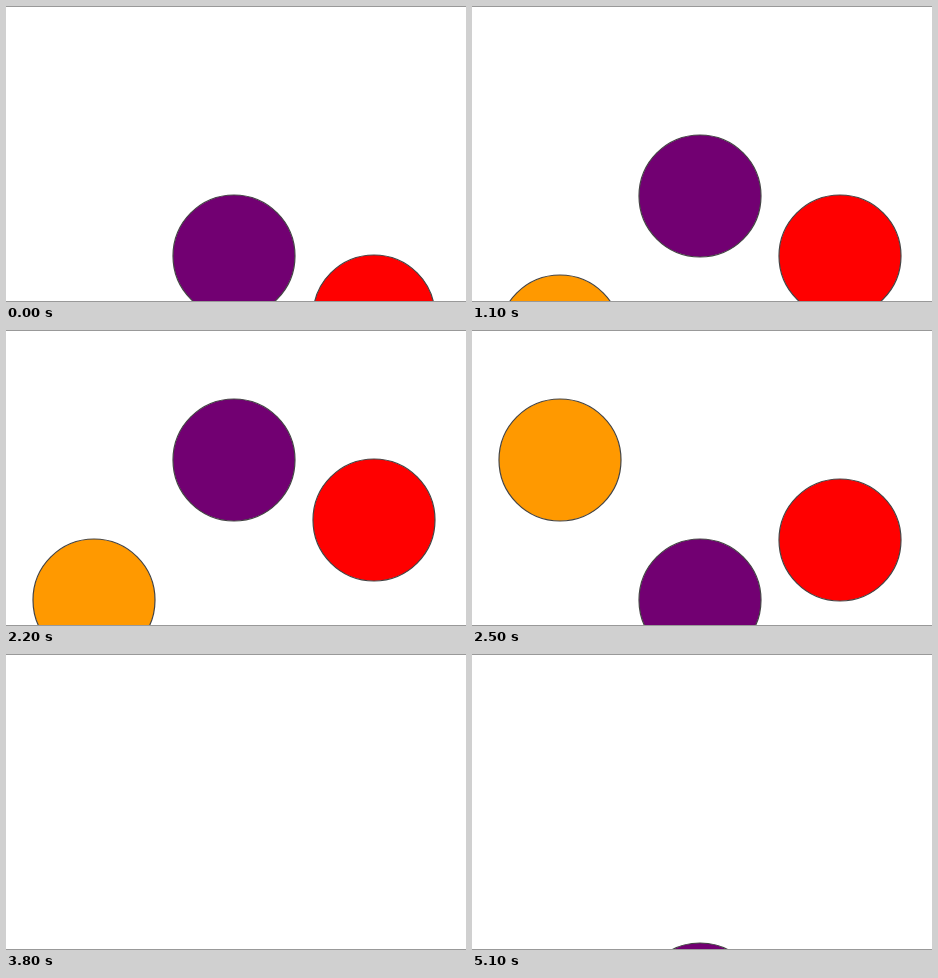
Recreate the animation shown at these times as an HTML page. Size 460 by 296 pixels, loop 5200 ms.

```html
<!DOCTYPE html>
<html lang="en">
<head>
<meta charset="utf-8">
<title>Three bouncing balls</title>
<style>
  html, body { margin: 0; width: 100%; height: 100%; overflow: hidden; background: #fff; }
  svg { display: block; width: 460px; height: 296px; }
  circle { stroke: #444; stroke-width: 1.2; }
  rect { fill: #999; }
</style>
</head>
<body>
<svg viewBox="0 0 460 296">
  <circle cx="88" cy="390" r="61" fill="#ff9900" data-phase="180"/>
  <circle cx="228" cy="250" r="61" fill="#720072" data-phase="320"/>
  <circle cx="368" cy="310" r="61" fill="#ff0000" data-phase="260"/>
  <rect width="460" height="1"/>
  <rect y="295" width="460" height="1"/>
</svg>
<script>
  const LOOP = 5200, STEP = 100;   // ms
  const TOP = 50, TRAVEL = 520;    // px; the lower turning point is off stage
  const balls = [...document.querySelectorAll('circle')];
  const start = performance.now();

  // Constant speed of 1 px per ms, reversing at both ends.
  const height = path => TOP + Math.abs(path % (2 * TRAVEL) - TRAVEL);

  function draw() {
    const time = (performance.now() - start) % LOOP;
    const moved = Math.floor(time / STEP) * STEP;
    for (const ball of balls) {
      ball.setAttribute('cy', height(moved + Number(ball.dataset.phase)));
    }
    requestAnimationFrame(draw);
  }
  draw();
</script>
</body>
</html>
```
